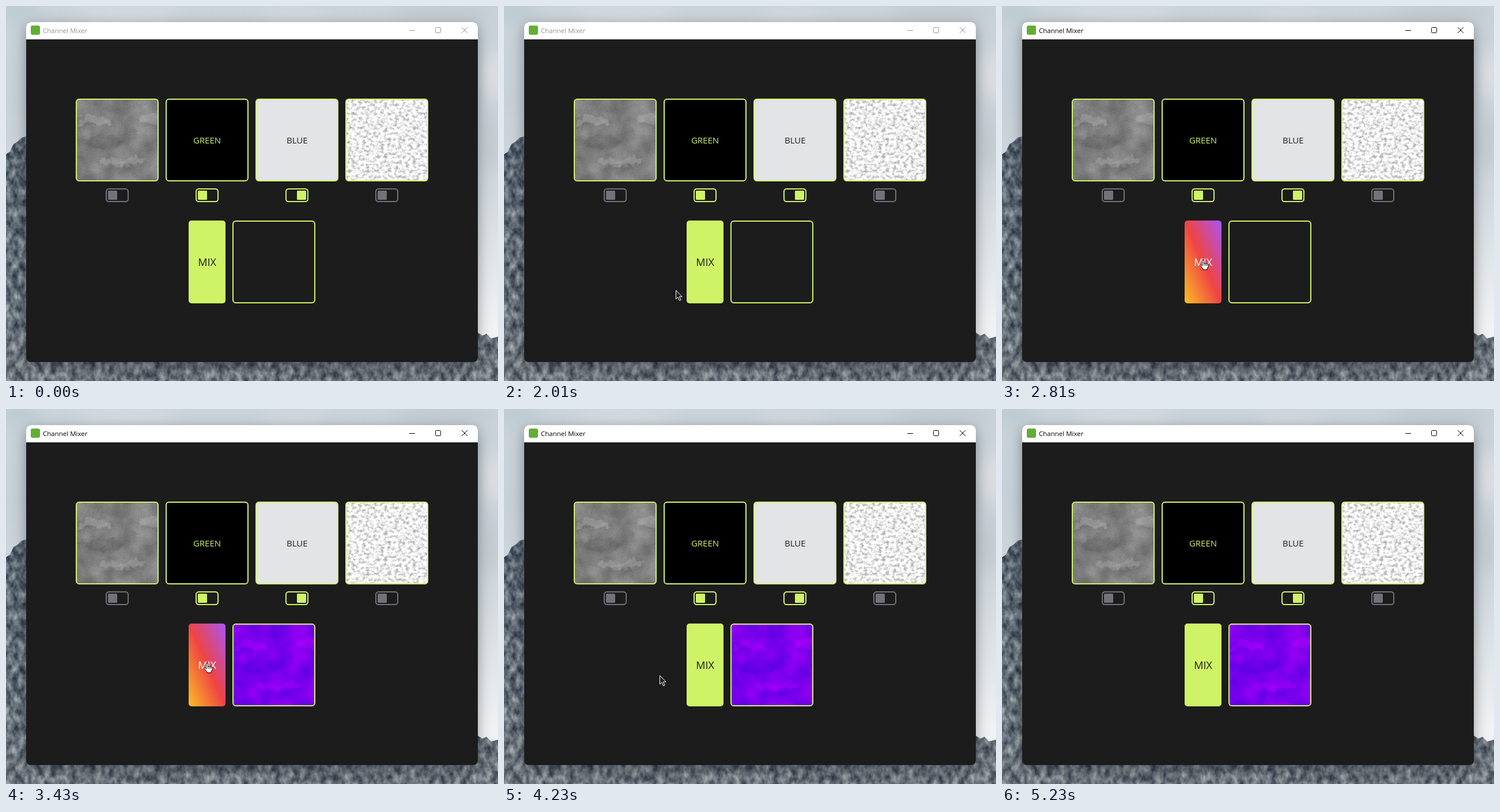
Write an HTML page that moves like this. It is 854x652 px and loops after 6.25 s.

```html
<!DOCTYPE html>
<html lang="en">
<head>
<meta charset="utf-8">
<title>Channel Mixer</title>
<style>
  html, body { margin: 0; width: 100%; height: 100%; overflow: hidden; background: #c3ced5; }
  svg { position: absolute; left: 0; top: 0; display: block; }
  text { font-family: "Open Sans", "Noto Sans", sans-serif; }
  .label { font-size: 15px; text-anchor: middle; }
  .frame { fill: none; stroke: #cff367; stroke-width: 2; }
</style>
</head>
<body>
<svg width="854" height="652" viewBox="0 0 854 652">
  <defs>
    <linearGradient id="sky" x2="0" y2="1">
      <stop offset="0" stop-color="#c9d3d9"/>
      <stop offset=".25" stop-color="#c6d0d6"/>
      <stop offset=".5" stop-color="#d2d9de"/>
      <stop offset=".85" stop-color="#f0f2f3"/>
    </linearGradient>
    <linearGradient id="slate" x2="0" y2="1">
      <stop offset="0" stop-color="#586470"/>
      <stop offset=".6" stop-color="#68727b"/>
      <stop offset="1" stop-color="#6b737b"/>
    </linearGradient>
    <linearGradient id="sunset" x1="0" y1="1" x2="1" y2="0">
      <stop offset="0" stop-color="#fbbf24"/>
      <stop offset=".5" stop-color="#ef4444"/>
      <stop offset="1" stop-color="#a855f7"/>
    </linearGradient>
    <filter id="soft" x="-50%" y="-100%" width="200%" height="300%"><feGaussianBlur stdDeviation="14"/></filter>
    <filter id="shadow" x="-10%" y="-10%" width="120%" height="125%">
      <feDropShadow dx="0" dy="7" stdDeviation="12" flood-color="#0a1018" flood-opacity=".36"/>
    </filter>
    <filter id="rock" x="0" y="0" width="100%" height="100%" color-interpolation-filters="sRGB">
      <feTurbulence type="fractalNoise" baseFrequency=".09 .06" numOctaves="5" seed="7"/>
      <feColorMatrix values="1 0 0 0 0  1 0 0 0 0  .9 0 0 0 .05  0 0 0 0 1"/>
      <feComposite operator="arithmetic" in2="SourceGraphic" k2=".7" k3="1" k4="-.35"/>
      <feComposite operator="in" in2="SourceGraphic"/>
    </filter>
    <filter id="concrete" x="0" y="0" width="100%" height="100%" color-interpolation-filters="sRGB">
      <feTurbulence type="fractalNoise" baseFrequency=".03" numOctaves="6" seed="4"/>
      <feColorMatrix values=".24 0 0 0 .38  .24 0 0 0 .38  .24 0 0 0 .38  0 0 0 0 1" result="blotch"/>
      <feTurbulence type="fractalNoise" baseFrequency=".7" numOctaves="2" seed="9"/>
      <feColorMatrix values="1 0 0 0 0  1 0 0 0 0  1 0 0 0 0  0 0 0 0 1"/>
      <feComposite operator="arithmetic" in2="blotch" k2=".16" k3="1" k4="-.08"/>
      <feComposite operator="in" in2="SourceGraphic"/>
    </filter>
    <filter id="rough" x="-10%" y="-10%" width="120%" height="120%">
      <feTurbulence type="fractalNoise" baseFrequency=".12" numOctaves="4" seed="2" result="n"/>
      <feGaussianBlur in="SourceGraphic" stdDeviation="1"/>
      <feDisplacementMap in2="n" scale="12" xChannelSelector="R" yChannelSelector="G"/>
    </filter>
    <filter id="cracks" x="0" y="0" width="100%" height="100%" color-interpolation-filters="sRGB">
      <feTurbulence type="fractalNoise" baseFrequency=".16 .2" numOctaves="5" seed="12"/>
      <feColorMatrix values=".8 0 0 0 .53  .8 0 0 0 .53  .8 0 0 0 .53  0 0 0 0 1"/>
      <feComposite operator="in" in2="SourceGraphic"/>
    </filter>
    <filter id="violet" x="0" y="0" width="100%" height="100%" color-interpolation-filters="sRGB">
      <feColorMatrix values="1.3 0 0 0 -.17  0 0 0 0 0  .4 0 0 0 .72  0 0 0 1 0"/>
    </filter>
    <clipPath id="tile"><rect x="1" y="1" width="142" height="142" rx="5"/></clipPath>
    <g id="stone" clip-path="url(#tile)">
      <rect width="144" height="144" filter="url(#concrete)"/>
      <g filter="url(#rough)">
        <path d="M2 50 8 36 24 28 46 32 62 37 61 45 40 45 25 41ZM40 106 60 104 80 109 100 100 122 104 117 112 90 117 52 115ZM108 30 150 24 150 44 114 41Z" fill="#fff" opacity=".16"/>
        <path d="M3 51 26 43 42 46 62 46M42 110 62 116 92 118 118 113" fill="none" stroke="#222" opacity=".3"/>
        <ellipse cx="50" cy="76" rx="32" ry="13" fill="#222" opacity=".1"/>
      </g>
    </g>
  </defs>

  <!-- Backdrop -->
  <rect width="854" height="652" fill="url(#sky)"/>
  <g filter="url(#soft)">
    <ellipse cx="20" cy="8" rx="40" ry="18" fill="#bccad2"/>
    <ellipse cx="210" cy="14" rx="90" ry="14" fill="#d5dde0"/>
    <ellipse cx="500" cy="20" rx="60" ry="10" fill="#d6dde0"/>
    <ellipse cx="760" cy="10" rx="90" ry="18" fill="#c0cad0"/>
    <ellipse cx="848" cy="120" rx="22" ry="46" fill="#dcdee1"/>
    <ellipse cx="844" cy="240" rx="20" ry="50" fill="#c3cbd0"/>
  </g>
  <path d="M0 258 7 253 13 240 20 236 27 229 34 227 60 240 90 560 819 568 827 573 834 570 842 578 854 575V652H0Z" fill="url(#slate)" filter="url(#rock)"/>

  <!-- Window -->
  <rect x="35" y="28" width="784" height="591" rx="8" fill="#1e1e1e" filter="url(#shadow)"/>
  <path d="M35 58V36a8 8 0 0 1 8-8H811a8 8 0 0 1 8 8V58Z" fill="#fff"/>
  <rect x="43" y="34" width="16" height="16" rx="3" fill="#62ae35"/>
  <g id="chrome">
    <text x="64" y="47" font-size="11.5">Channel Mixer</text>
    <path d="M700 42.5h10M791 37l10 10M801 37l-10 10" stroke="currentColor" fill="none"/>
    <rect x="745.5" y="37.5" width="9" height="9" rx="1" fill="none" stroke="currentColor"/>
  </g>

  <use href="#stone" x="121" y="161"/>
  <rect x="278" y="162" width="142" height="142" rx="5"/>
  <rect x="434" y="162" width="142" height="142" rx="5" fill="#e3e4e6"/>
  <rect x="590" y="162" width="142" height="142" rx="5" filter="url(#cracks)"/>
  <text class="label" x="349" y="239" fill="#cff367">GREEN</text>
  <text class="label" x="505.3" y="239" fill="#1e1e1e">BLUE</text>
  <g id="controls"></g>

  <rect id="button" x="317" y="373" width="64" height="144" rx="5"/>
  <text id="mix" x="349" y="452" font-size="18" text-anchor="middle">MIX</text>
  <g id="result" filter="url(#violet)"><use href="#stone" x="393" y="373"/></g>
  <rect class="frame" x="394" y="374" width="142" height="142" rx="5"/>

  <path id="arrow" d="M.5 .5V15.5L4 12.2 6.5 18.3 9 17.2 6.4 11.3H11.2Z" fill="#1e1e1e" stroke="#fff"/>
  <g id="hand" fill="#fff" stroke="#000" stroke-linejoin="round">
    <path d="M-1.5 10V1.3a1.4 1.4 0 0 1 2.9 0V6.2a1.4 1.4 0 0 1 2.7 .4 1.4 1.4 0 0 1 2.6 .5 1.3 1.3 0 0 1 2.4 .8V11.5L7 14.2V16.5H-.2V14.6L-4.6 9.7C-5.6 8 -3.6 6.9 -2.6 8.2Z"/>
    <path d="M1.4 6v4M4.1 6.6V10M6.7 7.3V10" fill="none" stroke-width=".8"/>
  </g>
</svg>
<script>
const LOOP = 6250, LIME = '#cff367', GREY = '#71727a';
const CLICK = 2810, MIXED = 3430;
const $ = id => document.getElementById(id);

// Pointer captures: [start ms, shape, x, y]
const pointer = [
  [0, ''],
  [1610, 'arrow', 201, 594],
  [1810, 'arrow', 241, 556],
  [2010, 'arrow', 298, 494],
  [2210, 'hand', 336, 445],
  [2410, 'hand', 349, 442],
  [4030, 'hand', 337, 446],
  [4230, 'arrow', 270, 463],
  [4430, 'arrow', 217, 530],
  [4630, 'arrow', 191, 598],
  [5030, '']
];

function control(column, color, on) {
  const x = 121 + 156 * column;
  return `<rect class="frame" x="${x + 1}" y="162" width="142" height="142" rx="5"/>
    <rect x="${x + 53}" y="318" width="38" height="22" rx="4.5" fill="none" stroke="${color}" stroke-width="2"/>
    <rect x="${x + (on ? 72 : 56)}" y="321" width="16" height="16" rx="1.5" fill="${color}"/>`;
}
$('controls').innerHTML =
  control(0, GREY) + control(1, LIME) + control(2, LIME, true) + control(3, GREY);

const show = (id, on) => $(id).setAttribute('visibility', on ? 'visible' : 'hidden');

function draw(t) {
  const [, shape, x, y] = pointer.findLast(p => p[0] <= t);
  const hover = shape === 'hand';
  const ink = t < CLICK ? '#929292' : '#000';
  $('chrome').setAttribute('color', ink);
  $('chrome').setAttribute('fill', ink);
  $('button').setAttribute('fill', hover ? 'url(#sunset)' : LIME);
  $('mix').setAttribute('fill', hover ? '#fff' : '#1e1e1e');
  show('result', t >= MIXED);
  for (const id of ['arrow', 'hand']) {
    show(id, id === shape);
    if (id === shape) $(id).setAttribute('transform', `translate(${x} ${y})`);
  }
}

const start = performance.now();
const changes = [...pointer.map(p => p[0]), CLICK, MIXED];
let drawn = -1;
function tick() {
  const t = (performance.now() - start) % LOOP;
  const step = Math.max(...changes.filter(c => c <= t));
  if (step !== drawn) draw(drawn = step);
  requestAnimationFrame(tick);
}
tick();
</script>
</body>
</html>
```
